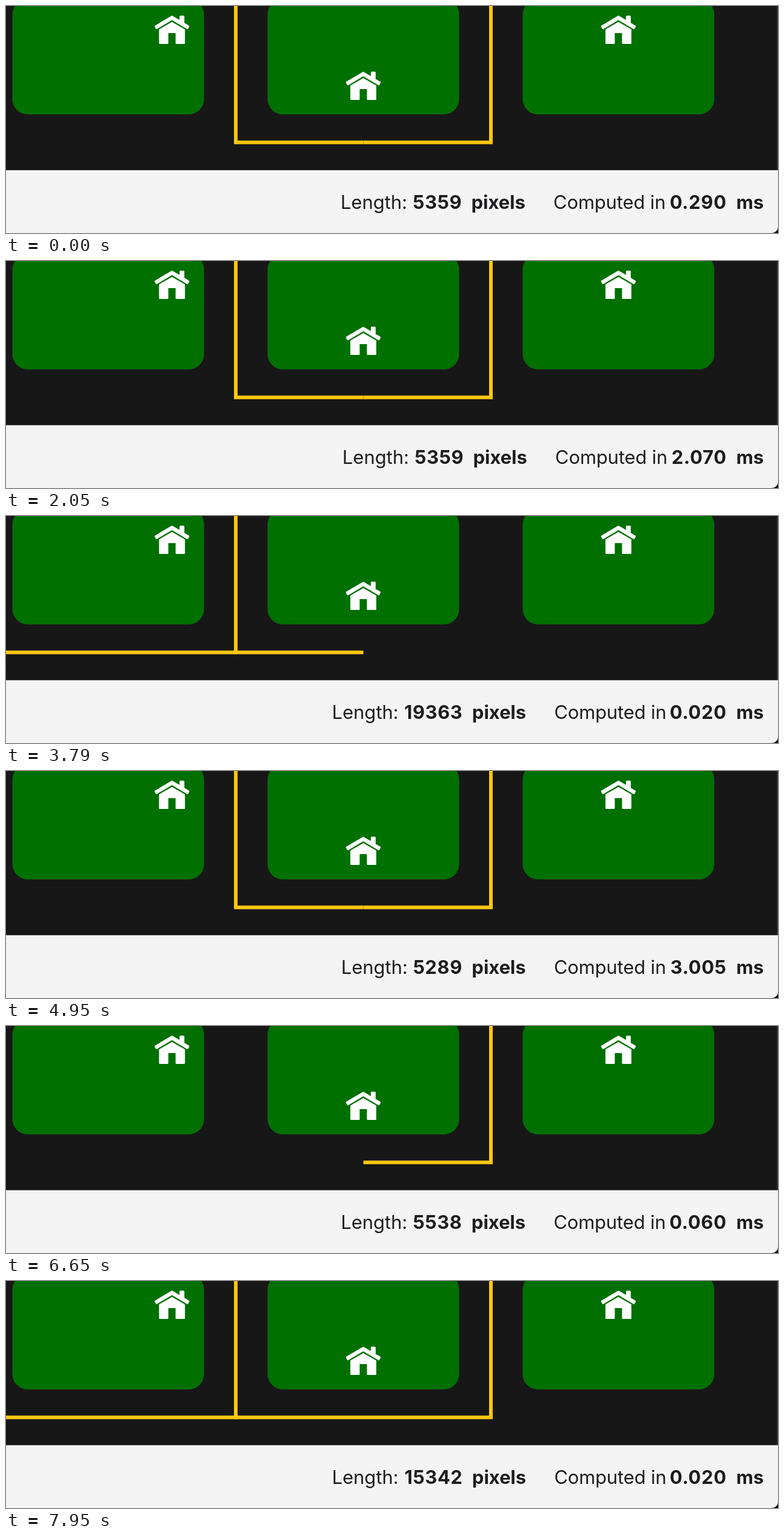
An HTML page for the animation above (7.99 s loop, 1280x377 px).

```html
<!DOCTYPE html>
<html lang="en">
<head>
<meta charset="utf-8">
<title>Connector routing</title>
<style>
  html, body { margin: 0; width: 100%; height: 100%; overflow: hidden; background: #171717; }
  svg { display: block; width: 1280px; height: 377px; }
  text { font: 400 31px Inter, "Open Sans", sans-serif; fill: #1d1d1f; }
  .bold { font-weight: 700; }
  .digits { letter-spacing: 0.7px; }
  .wire { fill: none; stroke: #ffc80f; stroke-width: 6; }
</style>
</head>
<body>
<svg viewBox="0 0 1280 377">
  <defs>
    <rect id="card" y="-11" width="317" height="190.7" rx="25" fill="#007000" stroke="#127312" stroke-width="0.6"/>
    <g id="house" fill="#fff" stroke="#fff" stroke-linejoin="round">
      <path stroke-width="3" d="M0 1.7 L14 10 V1.5 H19 V13 L27.3 17.8 L25.6 21 L0 5.8 L-25.6 21 L-27.3 17.8 Z"/>
      <path stroke-width="2" d="M0 11.7 L20.5 23.5 V46 H7 V28 H-7 V46 H-20.5 V23.5 Z"/>
    </g>
  </defs>
  <rect width="1280" height="377" fill="#171717"/>
  <rect x="1278.5" width="1.5" height="273" fill="#3c3c3c"/>
  <use href="#card" x="11"/>
  <use href="#card" x="434"/>
  <use href="#card" x="857"/>
  <use href="#house" x="275.2" y="15.9"/>
  <use href="#house" x="592.4" y="109.1"/>
  <use href="#house" x="1015.4" y="15.9"/>
  <path id="wireA" class="wire"/>
  <path id="wireB" class="wire"/>
  <rect y="272.7" width="1280" height="105" fill="#f4f4f4"/>
  <path d="M1280 367 A10 10 0 0 1 1270 377 H1280 Z" fill="#111"/>
  <g id="stats">
    <text id="label" y="337" text-anchor="end">Length:</text>
    <text id="length" class="bold digits" x="756" y="337" text-anchor="end"></text>
    <text class="bold" x="861.1" y="337" text-anchor="end">pixels</text>
    <text x="907.6" y="337" letter-spacing="-0.1">Computed in</text>
  </g>
  <text id="time" class="bold digits" x="1194.8" y="337" text-anchor="end"></text>
  <text class="bold" x="1256.3" y="337" text-anchor="end">ms</text>
</svg>
<script>
const LOOP = 7990;
const $ = id => document.getElementById(id);

const leftHalf = "M381 -5 V226.6 H592.5";
const rightHalf = "M592.5 226.6 H804 V-5";
const leftStem = "M381 -5 V229.6";

const box = [leftHalf, rightHalf];
const fromLeft = [leftStem, "M-5 226.6 H592.5"];
const fromRight = ["", rightHalf];
const across = [leftStem, "M-5 226.6 H804 V-5"];

// shift: the right-aligned row slides with the width of the time value
const states = [
  { at: 0,    length: "5359",  time: "0.290", shift: 0,   wires: box },
  { at: 1660, length: "5359",  time: "2.070", shift: 3,   wires: box },
  { at: 3130, length: "19363", time: "0.020", shift: 1.3, wires: fromLeft },
  { at: 4660, length: "5289",  time: "3.005", shift: 0.8, wires: box },
  { at: 6220, length: "5538",  time: "0.060", shift: 0.3, wires: fromRight },
  { at: 7740, length: "15342", time: "0.020", shift: 1.3, wires: across }
];

let shown;

function show(state) {
  if (state === shown) return;
  shown = state;
  $("wireA").setAttribute("d", state.wires[0]);
  $("wireB").setAttribute("d", state.wires[1]);
  $("length").textContent = state.length;
  $("time").textContent = state.time;
  $("label").setAttribute("x", state.length.length > 4 ? 649.5 : 665.2);
  $("stats").setAttribute("transform", `translate(${state.shift} 0)`);
}

function render(ms) {
  const t = ms % LOOP;
  show(states.findLast(s => s.at <= t) || states[0]);
}

const start = performance.now();
function tick() {
  render(performance.now() - start);
  requestAnimationFrame(tick);
}
tick();
</script>
</body>
</html>
```
